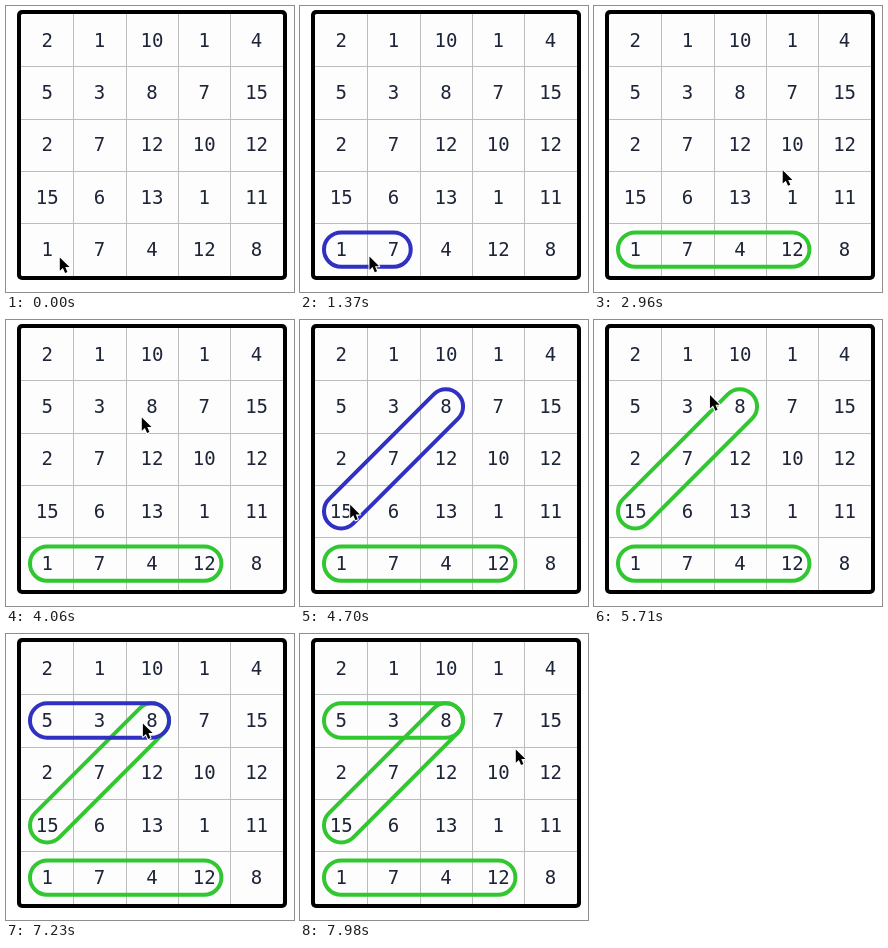
An HTML page with a canvas that plays this animation: 288 px wide and 286 px high, repeating every 8 s.

```html
<!DOCTYPE html>
<html lang="en">
<head>
<meta charset="utf-8">
<title>Number grid</title>
<style>
html, body { margin: 0; width: 100%; height: 100%; overflow: hidden; background: #fff; }
canvas { display: block; }
</style>
</head>
<body>
<canvas id="stage" width="288" height="286"></canvas>
<script>
const ctx = document.getElementById('stage').getContext('2d');
const LOOP = 8000;
const LEFT = 15, TOP = 8, CELL = 52.35;
const GREEN = '#30c730', BLUE = '#3030c2';
const ROWS = [
  [2, 1, 10, 1, 4],
  [5, 3, 8, 7, 15],
  [2, 7, 12, 10, 12],
  [15, 6, 13, 1, 11],
  [1, 7, 4, 12, 8]
];

// Pointer moves: first and last visible step, step count, then [time, x, y] points
const MOVES = [
  { from: 1320, to: 1720, steps: 8, path: [[1290, 53, 250], [1720, 200, 242]] },
  { from: 2500, to: 3250, steps: 14, path: [[2440, 200, 242], [2960, 188, 163], [3250, 157, 136]] },
  { from: 3310, to: 4060, steps: 14, path: [[3250, 157, 136], [3450, 138, 146], [3690, 90, 141], [4060, 135, 96]] },
  { from: 4120, to: 4870, steps: 14, path: [[4060, 135, 96], [4870, 38, 195]] },
  { from: 4930, to: 4990, steps: 2, path: [[4870, 38, 195], [4990, 45, 200]] },
  { from: 5590, to: 6220, steps: 12, path: [[5530, 45, 200], [5704, 115, 74], [5800, 122, 41], [5980, 84, 56], [6220, 38, 89]] },
  { from: 6820, to: 7340, steps: 10, path: [[6760, 38, 89], [7224, 136, 88], [7340, 139, 88]] },
  { from: 7930, to: 7980, steps: 2, path: [[7870, 139, 88], [7980, 215, 114]] }
];

// Rings: cells are [column, row]; the open end snaps to the pointer's column
const RINGS = [
  { start: [0, 4], end: [3, 4], down: 1320, dropped: 1720, solved: 2080 },
  { start: [2, 1], end: [0, 3], down: 4120, dropped: 4870, solved: 5290 },
  { start: [0, 1], end: [2, 1], down: 6820, dropped: 7340, solved: 7630 }
];

const center = (col, row) => [LEFT + CELL * (col + 0.5), TOP + CELL * (row + 0.5)];
const clamp = (v, a, b) => Math.min(Math.max(v, a), b);

function slope(path, i, axis) {
  if (i === 0 || i === path.length - 1) return 0;
  const a = path[i - 1], b = path[i + 1];
  return (b[axis] - a[axis]) / (b[0] - a[0]);
}

function along(path, time) {
  const t = clamp(time, path[0][0], path[path.length - 1][0]);
  let i = 0;
  while (i < path.length - 2 && t > path[i + 1][0]) i++;
  const a = path[i], b = path[i + 1], span = b[0] - a[0], u = (t - a[0]) / span;
  return [1, 2].map(axis => {
    const ease = u * u * (3 - 2 * u);
    return a[axis] + (b[axis] - a[axis]) * ease
      + span * (slope(path, i, axis) * u * (1 - u) ** 2
      - slope(path, i + 1, axis) * u * u * (1 - u));
  });
}

function pointerAt(time) {
  let move = MOVES[0];
  for (const m of MOVES) if (time >= m.from) move = m;
  if (time < move.from) return move.path[0].slice(1);
  const stepTime = (move.to - move.from) / (move.steps - 1);
  const step = Math.min(Math.floor((time - move.from) / stepTime + 0.15), move.steps - 1);
  return along(move.path, move.from + step * stepTime);
}

function drawGrid() {
  ctx.fillStyle = '#fff';
  ctx.fillRect(0, 0, 288, 286);
  ctx.fillStyle = '#000';
  ctx.beginPath();
  ctx.roundRect(11, 4, 270, 270, 5);
  ctx.fill();
  ctx.fillStyle = '#fdfdfd';
  ctx.beginPath();
  ctx.roundRect(15, 8, 262, 262, 1.5);
  ctx.fill();
  ctx.fillStyle = '#bcbcbc';
  for (let i = 1; i < 5; i++) {
    ctx.fillRect(Math.round(LEFT + CELL * i), 8, 1, 262);
    ctx.fillRect(15, Math.round(TOP + CELL * i), 262, 1);
  }
  ctx.fillStyle = '#1e2538';
  ctx.font = '19px "DejaVu Sans Mono", monospace';
  ctx.textAlign = 'center';
  ctx.textBaseline = 'alphabetic';
  ROWS.forEach((row, r) => row.forEach((n, c) => {
    const [x, y] = center(c, r);
    ctx.fillText(n, x, Math.round(y + 6.4));
  }));
}

function drawRing(ring, time, pointer) {
  if (time < ring.down) return;
  const [c0, r0] = ring.start, [c1, r1] = ring.end;
  let part = 1;
  if (time < ring.dropped) {
    const col = Math.floor((pointer[0] - LEFT) / CELL);
    part = clamp((col - c0) / (c1 - c0), 0, 1);
  }
  const [x0, y0] = center(c0, r0);
  const [x1, y1] = center(c0 + (c1 - c0) * part, r0 + (r1 - r0) * part);
  const angle = Math.atan2(y1 - y0, x1 - x0);
  ctx.beginPath();
  ctx.arc(x0, y0, 17.2, angle + Math.PI / 2, angle + Math.PI * 1.5);
  ctx.arc(x1, y1, 17.2, angle - Math.PI / 2, angle + Math.PI / 2);
  ctx.closePath();
  ctx.lineWidth = 4;
  ctx.strokeStyle = time < ring.solved ? BLUE : GREEN;
  ctx.stroke();
}

function drawPointer([x, y]) {
  ctx.save();
  ctx.translate(x + 0.8, y + 1.4);
  ctx.beginPath();
  ctx.moveTo(0, 0);
  ctx.lineTo(0, 13.4);
  ctx.lineTo(3.1, 10.5);
  ctx.lineTo(5.3, 15.6);
  ctx.lineTo(7.6, 14.6);
  ctx.lineTo(5.5, 9.7);
  ctx.lineTo(9.7, 9.7);
  ctx.closePath();
  ctx.lineJoin = 'round';
  ctx.lineWidth = 2;
  ctx.strokeStyle = '#fff';
  ctx.stroke();
  ctx.fillStyle = '#000';
  ctx.fill();
  ctx.restore();
}

function draw(now) {
  const time = now % LOOP;
  const pointer = pointerAt(time);
  drawGrid();
  RINGS.forEach(ring => drawRing(ring, time, pointer));
  drawPointer(pointer);
}

const begin = performance.now();
function frame() {
  draw(performance.now() - begin);
  requestAnimationFrame(frame);
}
frame();
</script>
</body>
</html>
```
